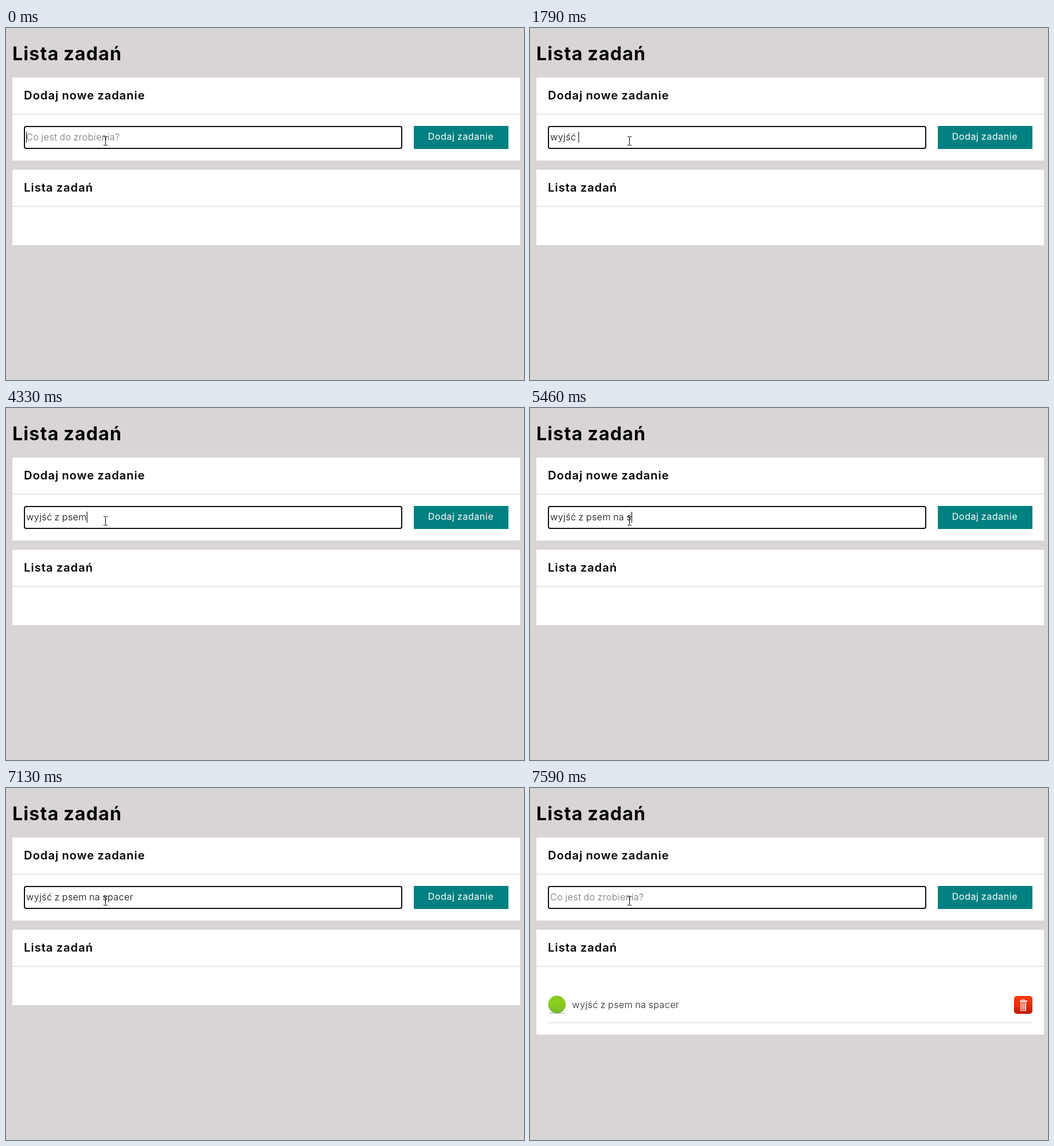
Recreate the animation shown at these times as an HTML page with a canvas. Size 898 by 611 pixels, loop 8000 ms.

```html
<!DOCTYPE html>
<html lang="pl">
<head>
<meta charset="utf-8">
<title>Lista zadań</title>
<style>
  html, body { margin: 0; width: 100%; height: 100%; overflow: hidden; background: #d9d5d4; }
  canvas { display: block; }
</style>
</head>
<body>
<canvas id="stage" width="898" height="611"></canvas>
<script>
const ctx = document.getElementById('stage').getContext('2d');
const LOOP = 8000;
const BLINK = 530;
const ENTER = 7060;
const LOCK = 7130;
const ADDED = 7260;
const FIRST_FOCUS = 70 - BLINK;
const INPUT_X = 35;
const LINE = '#d5d5d5';

// Each chunk is typed between two times, with a power curve for its rhythm
const CHUNKS = [
  { str: 'wyjść ', from: 130, to: 1790, pow: 0.8 },
  { str: 'z ', from: 2390, to: 3320, pow: 1 },
  { str: 'psem ', from: 3520, to: 4530, pow: 1 },
  { str: 'na ', from: 4730, to: 5190, pow: 1 },
  { str: 'spacer', from: 5460, to: 6800, pow: 2 }
];
const TASK = CHUNKS.map(c => c.str).join('');
const KEY_TIMES = CHUNKS.flatMap(({ str, from, to, pow }) =>
  [...str].map((_, i) => from + (to - from) * (i / (str.length - 1)) ** pow));
const CARET_RESETS = [FIRST_FOCUS, ...KEY_TIMES, ENTER];

const STYLES = {
  title:   { weight: 700, size: 32, spacing: 1.15 },
  heading: { weight: 600, size: 20, spacing: 0.97 },
  button:  { weight: 400, size: 16, spacing: 0.55 },
  body:    { weight: 300, size: 16, spacing: 0.42 }
};

function setStyle(name) {
  const { weight, size, spacing } = STYLES[name];
  ctx.font = `${weight} ${size}px Inter, "Open Sans", sans-serif`;
  ctx.letterSpacing = spacing + 'px';
  ctx.wordSpacing = '-0.8px';
}

function text(str, x, y, style, color = '#000') {
  setStyle(style);
  ctx.fillStyle = color;
  ctx.fillText(str, x, y);
}

function rect(x, y, w, h, color) {
  ctx.fillStyle = color;
  ctx.fillRect(x, y, w, h);
}

function gradient(top, bottom, ...colors) {
  const g = ctx.createLinearGradient(0, top, 0, bottom);
  colors.forEach((c, i) => g.addColorStop(i / (colors.length - 1), c));
  return g;
}

function card(y, h, heading) {
  rect(11, y, 880, h, '#fff');
  rect(11, y + 63, 880, 1, LINE);
  text(heading, 31, y + 38, 'heading');
}

function caretVisible(t) {
  if (t >= LOCK && t < ADDED) return false;
  const reset = CARET_RESETS.filter(r => r <= t).pop();
  return Math.floor((t - reset) / BLINK) % 2 === 0;
}

function inputField(t, value) {
  ctx.strokeStyle = '#101010';
  ctx.lineWidth = 2;
  ctx.beginPath();
  ctx.roundRect(32, 171, 654, 38, 3);
  ctx.stroke();

  if (value) text(value, INPUT_X, 195, 'body');
  else text('Co jest do zrobienia?', INPUT_X, 195, 'body', '#6c7471');

  if (caretVisible(t)) {
    rect(Math.round(INPUT_X + ctx.measureText(value).width), 180, 1, 19, '#000');
  }
}

function doneIcon() {
  rect(34, 390, 26, 1.5, '#b9bdb4');
  ctx.fillStyle = gradient(360, 391, '#86c524', '#8dd01c', '#84c626', '#70b32e');
  ctx.beginPath();
  ctx.arc(46.8, 375.7, 15.2, 0, Math.PI * 2);
  ctx.fill();
}

function binIcon() {
  ctx.fillStyle = gradient(361, 392, '#fa3a08', '#ee2d08', '#bd1a08');
  ctx.beginPath();
  ctx.roundRect(839, 361, 32, 31, 5);
  ctx.fill();
  ctx.strokeStyle = '#fff';
  ctx.lineWidth = 1;
  ctx.strokeRect(852.5, 367.5, 5, 2);
  rect(849, 369, 13, 2, '#fff');
  ctx.strokeRect(850.5, 372.5, 9, 14);
  for (let x = 852; x <= 858; x += 2) rect(x, 374, 1, 11, '#fff');
}

function taskRow() {
  doneIcon();
  text(TASK, 73, 382, 'body', '#222');
  binIcon();
  rect(31, 407, 840, 1, LINE);
}

function pointer() {
  for (const y of [188, 203]) {
    rect(169, y, 3, 1, '#000');
    rect(173, y, 3, 1, '#000');
  }
  rect(172, 189, 1, 14, '#000');
}

function draw(t) {
  const added = t >= ADDED;
  const count = added ? 0 : KEY_TIMES.filter(k => k <= t).length;

  rect(0, 0, 898, 611, '#d9d5d4');
  text('Lista zadań', 11, 56, 'title');
  card(86, 144, 'Dodaj nowe zadanie');
  card(246, added ? 182 : 131, 'Lista zadań');

  inputField(t, TASK.slice(0, count));
  rect(707, 170, 164, 40, '#008080');
  text('Dodaj zadanie', 731.5, 194, 'button', '#fff');

  if (added) taskRow();
  pointer();
}

const begin = performance.now();
function frame() {
  draw((performance.now() - begin) % LOOP);
  requestAnimationFrame(frame);
}
frame();
</script>
</body>
</html>
```
